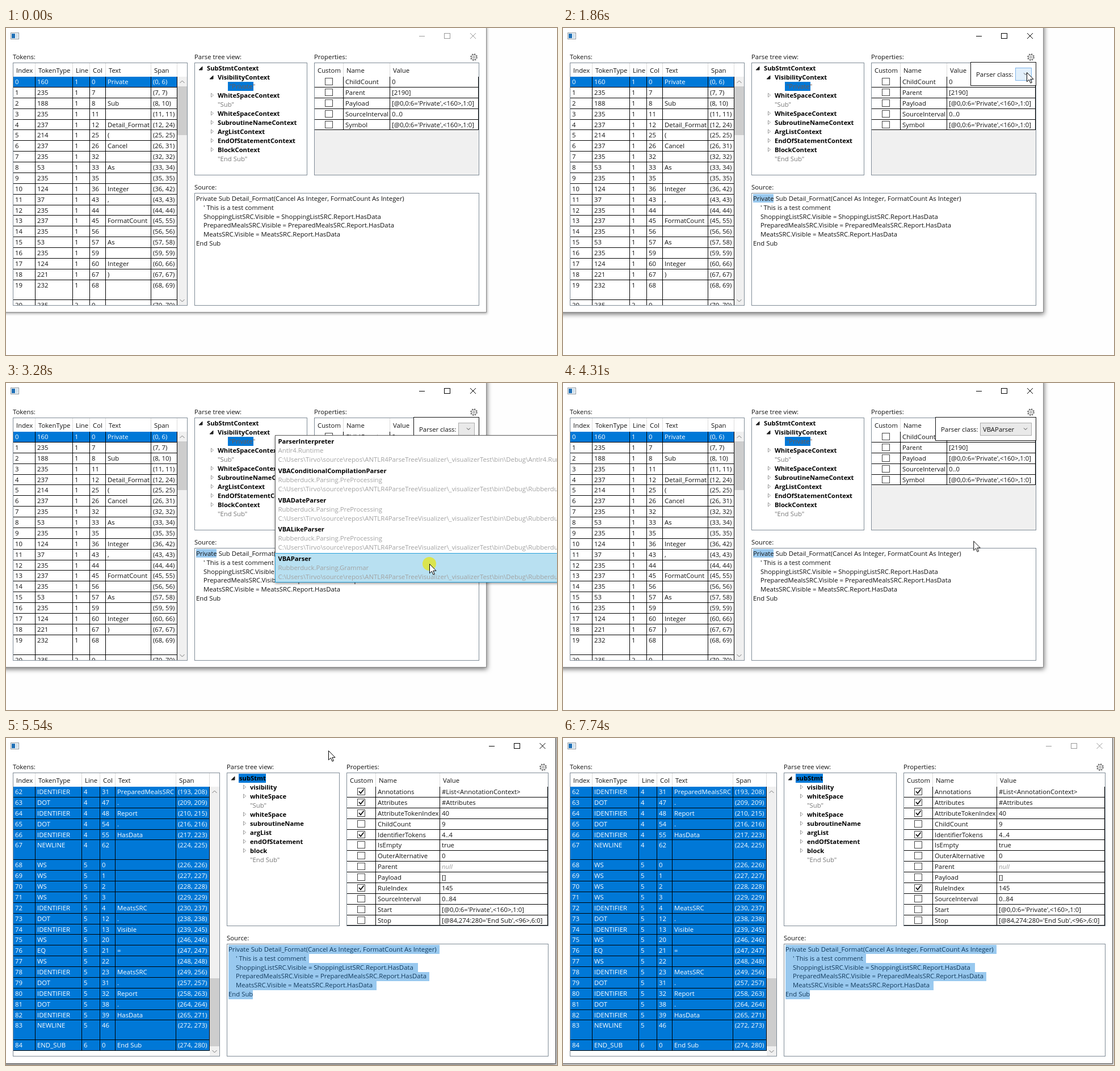
An HTML page that plays this animation: 971 px wide and 577 px high, repeating every 7810 ms.

```html
<!DOCTYPE html>
<html lang="en">
<head>
<meta charset="utf-8">
<title>Parse tree visualizer</title>
<style>
html, body { margin: 0; width: 100%; height: 100%; overflow: hidden; background: #fefefe; }
svg { display: block; width: 971px; height: 577px; }
rect, .crisp { shape-rendering: crispEdges; }
text { font: 11.35px "Open Sans", "Noto Sans", sans-serif; white-space: pre; fill: #111; }
.bold { font-weight: 700; font-size: 11.2px; fill: #000; }
.white { fill: #fff; }
.grey { fill: #777; }
.pale { fill: #a2a2a2; }
.null { fill: #999; font-style: italic; }
.onblue { fill: #75584f; }
.selected { fill: #123a5c; }

.win, .buttons, .step { animation: 7810ms step-end infinite; }
.win { animation-name: focusShadow; }
.buttons { animation-name: focusButtons; }
.first { animation-name: first; }
.second { animation-name: second; }
.mark { animation-name: mark; }
.popup { animation-name: popup; }
.chosen { animation-name: chosen; }
.hover { animation-name: hover; }
.list { animation-name: list; }
.item { animation-name: item; }
.edge { animation-name: edge; }
.click { animation-name: click; }
.pointer { animation: pointer 7810ms linear infinite; }
.visible { animation-name: pointerShown; }

@keyframes focusShadow {
  0%, 99.1% { filter: drop-shadow(1px 2px 2px rgba(0,0,0,.35)); }
  16.77% { filter: drop-shadow(1px 3px 4px rgba(0,0,0,.55)); }
}
@keyframes focusButtons { 0%, 99.1% { stroke: #999; } 16.77% { stroke: #000; } }
@keyframes first { 0% { opacity: 1; } 70.93%, 100% { opacity: 0; } }
@keyframes second { 0% { opacity: 0; } 70.93%, 100% { opacity: 1; } }
@keyframes mark { 0% { opacity: 0; } 17.8%, 100% { opacity: 1; } }
@keyframes popup { 0%, 44.17%, 100% { opacity: 0; } 17.8% { opacity: 1; } }
@keyframes chosen { 0%, 64%, 100% { opacity: 0; } 44.17% { opacity: 1; } }
@keyframes hover { 0%, 27.78%, 100% { opacity: 0; } 22.79% { opacity: 1; } }
@keyframes list { 0%, 44.17%, 100% { opacity: 0; } 27.78% { opacity: 1; } }
@keyframes item {
  0% { transform: translateY(0); }
  31.9% { transform: translateY(51.75px); }
  33.7% { transform: translateY(103.5px); }
  35.1% { transform: translateY(155.25px); }
  37.9%, 100% { transform: translateY(207px); }
}
@keyframes edge { 0%, 88.09%, 100% { opacity: 0; } 85.1% { opacity: 1; } }
@keyframes click {
  0%, 18.82%, 28.8%, 44.17%, 66.96%, 100% { opacity: 0; }
  16.77%, 26.76%, 41.99%, 63% { opacity: 1; }
}
@keyframes pointerShown { 0%, 88.09%, 100% { opacity: 0; } 3.84% { opacity: 1; } }
@keyframes pointer {
  0%, 3.84% { transform: translate(854px, 250px); }
  5.89% { transform: translate(800px, 110px); }
  6.91% { transform: translate(768px, 8px); }
  7.94% { transform: translate(802px, 20px); }
  8.96%, 9.9% { transform: translate(854px, 52px); }
  12.8%, 14% { transform: translate(833px, 49px); }
  14.85%, 20.8% { transform: translate(829px, 47px); }
  23.81%, 28.8% { transform: translate(817px, 78px); }
  30.85%, 31% { transform: translate(816px, 117px); }
  33.8% { transform: translate(800px, 200px); }
  35.85% { transform: translate(775px, 275px); }
  38.92%, 54.3% { transform: translate(746px, 319px); }
  61.2%, 62% { transform: translate(571px, 8px); }
  63%, 80% { transform: translate(568px, 22px); }
  88.09%, 100% { transform: translate(715px, 560px); }
}
</style>
</head>
<body>
<svg id="stage" viewBox="0 0 971 577"></svg>
<script>
const BLUE = '#0078d7', MARK = '#99c9ef', BORDER = '#7f8b96';
const ROW = 18.88, TALL_ROW = 34.9, LINE = 15.95;

const escape = s => String(s).replace(/&/g, '&amp;').replace(/</g, '&lt;');
const text = (x, y, s, cls = '') => `<text x="${x}" y="${Math.round(y)}" class="${cls}">${escape(s)}</text>`;
const fill = (x, y, w, h, color) => `<rect x="${x}" y="${y}" width="${w}" height="${h}" fill="${color}"/>`;
const box = (x, y, right, bottom, stroke = BORDER, color = '#fff') =>
  `<rect x="${x + .5}" y="${y + .5}" width="${right - x - 1}" height="${bottom - y - 1}" fill="${color}" stroke="${stroke}"/>`;
const path = (d, stroke, color = 'none', extra = '') => `<path d="${d}" stroke="${stroke}" fill="${color}" ${extra}/>`;
const group = (cls, ...parts) => `<g class="${cls}">${parts.join('')}</g>`;
const columnX = (left, seps, i) => i ? seps[i - 1] : left;

function titleBar(right) {
  const x = right - 119;
  return box(8, 8, 23, 20, '#8a949c') + fill(10, 10, 6, 8, '#1f6fb5') + fill(17, 10, 4, 8, '#cfe0ec') +
    `<g class="buttons" fill="none">
      <path class="crisp" d="M${x} 14.5h10M${x + 44.5} 9.5h10v9h-10z"/>
      <path d="M${x + 90} 9l10 10m0-10l-10 10"/>
    </g>`;
}

function gear(x) {
  return `<g fill="none" stroke="#555" stroke-width=".9" transform="translate(${x} 51.5)">
    <circle r="4.4"/><circle r="5.6" stroke-width="1.4" stroke-dasharray="2.2 2.2"/><circle r="1.7"/></g>`;
}

function header(left, seps, titles) {
  return titles.map((s, i) => text(columnX(left, seps, i) + 6, 79, s)).join('') +
    seps.map(x => fill(x, 62, 1, 24, '#dcdcdc')).join('');
}

function scrollBar(x, bottom, thumbTop, thumbBottom) {
  const mid = x + 8.5;
  return fill(x, 86, 17, bottom - 87, '#f0f0f0') + fill(x, thumbTop, 17, thumbBottom - thumbTop, '#cdcdcd') +
    path(`M${mid - 4} 97l4-4 4 4M${mid - 4} ${bottom - 11}l4 4 4-4`, '#777');
}

// Each token is "type text"; spans, lines and columns follow from the text lengths.
function tokenTable({ right, bottom, seps, thumb, tokens, index, line, col, start, isNewline, isSelected, clip }) {
  let y = 86, rows = '';
  const edge = seps[seps.length - 1];
  for (const token of tokens) {
    const [type, ...words] = token.split(' ');
    const label = words.join(' '), newline = isNewline(type);
    const length = newline ? 2 : label.length || 1;
    const top = Math.round(y), next = y + (newline ? TALL_ROW : ROW), end = Math.round(next);
    const selected = isSelected(index);
    if (selected) rows += fill(13, top, edge - 13, end - top, BLUE);
    rows += fill(13, end - 1, edge - 12, 1, '#000');
    [index, type, line, col, label, `(${start}, ${start + length - 1})`].forEach((s, i) => {
      rows += text(columnX(12, seps, i) + 4, top + 13, s, selected ? 'white' : '');
    });
    start += length;
    col += length;
    index++;
    if (newline) { line++; col = 0; }
    y = next;
  }
  rows += seps.map(x => fill(x, 86, 1, Math.round(y) - 86, '#000')).join('');
  return text(12, 55, 'Tokens:') + box(12, 61, right, bottom) +
    header(12, seps, ['Index', 'TokenType', 'Line', 'Col', 'Text', 'Span']) +
    `<clipPath id="${clip}"><rect x="12" y="61" width="${right - 12}" height="${bottom - 62}"/></clipPath>` +
    `<g clip-path="url(#${clip})">${rows}</g>` + scrollBar(edge + 1, bottom, ...thumb);
}

// Node prefixes: "-" expanded, "+" collapsed, none for a leaf.
function tree(left, bottom, nodes, selected, selectedBox) {
  let out = text(left, 55, 'Parse tree view:') + box(left, 61, left + 199, bottom);
  nodes.forEach(([depth, name], i) => {
    const x = left + 22 + depth * 19, y = Math.round(75.4 + i * LINE), mark = name[0];
    const branch = mark === '-' || mark === '+';
    if (i === selected) out += fill(...selectedBox, BLUE);
    if (mark === '-') out += path(`M${x - 8} ${y - 7}v6h-6z`, '#222', '#222');
    if (mark === '+') out += path(`M${x - 11.5} ${y - 8}v7l4-3.5z`, '#999', '#fff');
    out += text(x + (depth > 1 ? 1.5 : 0), y, branch ? name.slice(1) : name,
      branch ? 'bold' : i === selected ? 'onblue' : 'grey');
  });
  return out;
}

function properties(left, right, bottom, seps, rows) {
  const end = Math.round(86 + rows.length * ROW);
  let out = text(left, 55, 'Properties:') + box(left, 61, right, bottom, BORDER, '#f0f0f0') +
    fill(left + 1, 62, right - left - 2, end - 62, '#fff') + header(left, seps, ['Custom', 'Name', 'Value']);
  rows.forEach(([name, value, checked], i) => {
    const y = Math.round(86 + i * ROW), x = left + 19;
    out += box(x, y + 2, x + 14, y + 15, '#444');
    if (checked) out += path(`M${x + 3} ${y + 8}l3 3.5 5.5-7`, '#111', 'none', 'stroke-width="1.8"');
    out += text(seps[0] + 4, y + 13, name) + text(seps[1] + 4, y + 13, value, value === 'null' ? 'null' : '');
    out += fill(left + 1, Math.round(86 + (i + 1) * ROW) - 1, right - left - 2, 1, '#000');
  });
  return out + [...seps, right - 2].map(x => fill(x, 86, 1, end - 86, '#000')).join('') + gear(right - 9.5);
}

const sourceLines = [
  'Private Sub Detail_Format(Cancel As Integer, FormatCount As Integer)',
  "' This is a test comment",
  'ShoppingListSRC.Visible = ShoppingListSRC.Report.HasData',
  'PreparedMealsSRC.Visible = PreparedMealsSRC.Report.HasData',
  'MeatsSRC.Visible = MeatsSRC.Report.HasData',
  'End Sub'
];

function source(left, top, right, bottom, marks, cls) {
  return text(left, top - 6, 'Source:') + box(left, top, right, bottom) + marks +
    sourceLines.map((s, i) => text(left + (i % 5 ? 16 : 3), top + 13.6 + i * LINE, s, cls)).join('');
}

const firstScene = () => group('step first',
  `<g class="win">${box(-9, -9, 847, 502, '#8c8c8c')}</g>`,
  titleBar(847),
  tokenTable({
    right: 320, bottom: 490, seps: [51, 117, 147, 175, 255, 301], thumb: [103, 189], clip: 'clipFirst',
    index: 0, line: 1, col: 0, start: 0,
    isNewline: type => type === '232', isSelected: i => i === 0,
    tokens: ['160 Private', '235', '188 Sub', '235', '237 Detail_Format', '214 (', '237 Cancel', '235', '53 As',
      '235', '124 Integer', '37 ,', '235', '237 FormatCount', '235', '53 As', '235', '124 Integer', '221 )', '232', '235']
  }),
  tree(332, 260, [[0, '-SubStmtContext'], [1, '-VisibilityContext'], [2, '"Private"'], [1, '+WhiteSpaceContext'],
    [1, '"Sub"'], [1, '+WhiteSpaceContext'], [1, '+SubroutineNameContext'], [1, '+ArgListContext'],
    [1, '+EndOfStatementContext'], [1, '+BlockContext'], [1, '"End Sub"']], 2, [391, 95, 45, 16]),
  properties(543, 834, 260, [594, 676], [['ChildCount', '0'], ['Parent', '[2190]'],
    ['Payload', "[@0,0:6='Private',<160>,1:0]"], ['SourceInterval', '0..0'],
    ['Symbol', "[@0,0:6='Private',<160>,1:0]"]]),
  source(332, 291, 834, 490, group('step mark', fill(335, 293, 36, 15, MARK)), ''),
  settings(718, 'popup', ''),
  settings(656, 'chosen', 'VBAParser'),
  parserList()
);

function settings(left, cls, value) {
  const x = left + 79;
  return group('step ' + cls,
    box(left, 60, 834, 102, '#111'), text(left + 10, 86, 'Parser class:'),
    box(x, 70, 826, 93, '#acacac', '#e9e9e9'),
    value ? '' : group('step hover', box(x, 70, 826, 93, '#7eb4ea', '#e2f0fc')),
    text(x + 5, 86, value), path('M812 79.5l3 3 3-3', '#444'));
}

function parserList() {
  const folder = String.raw`C:\Users\Tirvo\source\repos\ANTLR4ParseTreeVisualizer\_visualizerTest\bin\Debug` + '\\';
  const rubberduck = 'Rubberduck.Parsing';
  const parsers = [
    ['ParserInterpreter', 'Antlr4.Runtime', 'Antlr4.Runtime'],
    ['VBAConditionalCompilationParser', rubberduck + '.PreProcessing', rubberduck],
    ['VBADateParser', rubberduck + '.PreProcessing', rubberduck],
    ['VBALikeParser', rubberduck + '.PreProcessing', rubberduck],
    ['VBAParser', rubberduck + '.Grammar', rubberduck]
  ];
  return group('step list',
    `<g style="filter:drop-shadow(0 2px 2px rgba(0,0,0,.4))">${box(474, 92, 990, 352, '#606060')}</g>`,
    group('step item', box(474, 93, 990, 145, '#26a0da', '#b8e0f1')),
    ...parsers.map(([name, space, file], i) => {
      const y = 107 + i * 51.75;
      return text(479.5, y, name, 'bold') + text(479.5, y + 16, space, 'pale') +
        text(479.5, y + 32, folder + file + '.dll', 'pale');
    }));
}

const secondScene = () => group('step second',
  `<g class="win">${box(-9, -9, 969, 575, '#555')}</g>`,
  titleBar(969.5),
  tokenTable({
    right: 377, bottom: 562, seps: [51, 133, 165, 192, 299, 358], thumb: [424, 544], clip: 'clipSecond',
    index: 62, line: 4, col: 31, start: 193,
    isNewline: type => type === 'NEWLINE', isSelected: () => true,
    tokens: ['IDENTIFIER PreparedMealsSRC', 'DOT .', 'IDENTIFIER Report', 'DOT .', 'IDENTIFIER HasData', 'NEWLINE',
      'WS', 'WS', 'WS', 'WS', 'IDENTIFIER MeatsSRC', 'DOT .', 'IDENTIFIER Visible', 'WS', 'EQ =', 'WS',
      'IDENTIFIER MeatsSRC', 'DOT .', 'IDENTIFIER Report', 'DOT .', 'IDENTIFIER HasData', 'NEWLINE', 'END_SUB End Sub']
  }),
  tree(389, 332, [[0, '-subStmt'], [1, '+visibility'], [1, '+whiteSpace'], [1, '"Sub"'], [1, '+whiteSpace'],
    [1, '+subroutineName'], [1, '+argList'], [1, '+endOfStatement'], [1, '+block'], [1, '"End Sub"']],
    0, [410, 63, 48, 16]),
  properties(600, 956, 332, [651, 764], [['Annotations', '#List<AnnotationContext>', 1], ['Attributes', '#Attributes', 1],
    ['AttributeTokenIndex', '40', 1], ['ChildCount', '9'], ['IdentifierTokens', '4..4', 1], ['IsEmpty', 'true'],
    ['OuterAlternative', '0'], ['Parent', 'null'], ['Payload', '[]'], ['RuleIndex', '145', 1],
    ['SourceInterval', '0..84'], ['Start', "[@0,0:6='Private',<160>,1:0]"],
    ['Stop', "[@84,274:280='End Sub',<96>,6:0]"]]),
  source(389, 363, 956, 562,
    [764, 534, 726, 746, 653, 435].map((end, i) => fill(392, 365 + Math.round(i * LINE), end - 392, 16, MARK)).join(''),
    'selected'),
  group('step edge', box(389, 363, 956, 562, '#569de5', 'none'))
);

const pointer = () => group('step visible', group('pointer',
  group('step click', '<circle r="12" fill="#ebe600" opacity=".68"/>'),
  path('M.5.5V16.8L4.3 13.2 6.9 19.2 9.3 18.2 6.8 12.3H12Z', '#000', '#fff')));

document.getElementById('stage').innerHTML = firstScene() + secondScene() + pointer();
</script>
</body>
</html>
```
